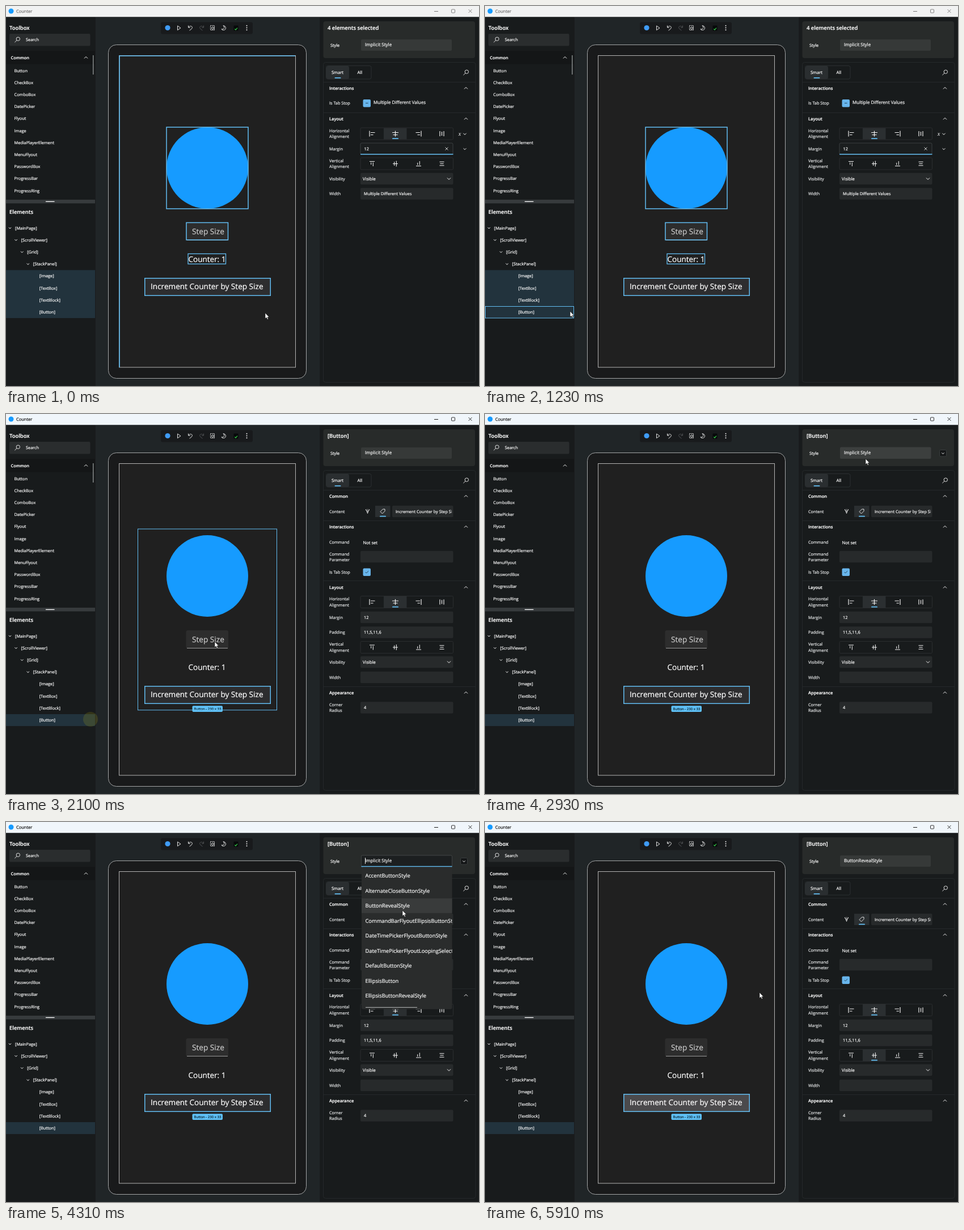
An HTML page for the animation above (6.53 s loop, 834 by 671 pixels).

```html
<!DOCTYPE html>
<html lang="en">
<head>
<meta charset="utf-8">
<title>Counter</title>
<style>
  html, body { margin: 0; width: 100%; height: 100%; overflow: hidden; background: #181b1c; }
  svg { display: block; width: 834px; height: 671px; }
  text { font-family: "Open Sans", "Noto Sans", sans-serif; text-rendering: geometricPrecision; white-space: pre; }
</style>
</head>
<body>
<svg id="stage" viewBox="0 0 834 671"></svg>
<script>
const LOOP = 6530;
const BLUE = '#62bdf2', FIELD = '#272a2b', LINE = '#25292b', INK = '#f6f6f6';

// Drawing helpers: each returns SVG markup.
const rect = (x, y, w, h, fill, rx = 0, more = '') =>
  `<rect x="${x}" y="${y}" width="${w}" height="${h}" fill="${fill}" rx="${rx}" ${more}/>`;
const frame = (x, y, w, h, color, width = 1, rx = 0, fill = 'none') =>
  rect(x, y, w, h, fill, rx, `stroke="${color}" stroke-width="${width}"`);
const path = (d, color = INK, width = 1, fill = 'none') =>
  `<path d="${d}" fill="${fill}" stroke="${color}" stroke-width="${width}"/>`;
const dot = (x, y, r, fill) => `<circle cx="${x}" cy="${y}" r="${r}" fill="${fill}"/>`;
const text = (x, mid, str, size = 7.35, fill = INK, weight = 400) =>
  `<text x="${x}" y="${mid + size * 0.36}" font-size="${size}" font-weight="${weight}" ` +
  `fill="${fill}" stroke="${fill}" stroke-width=".22">${str}</text>`;
const group = (name, ...parts) => `<g class="${name}">${parts.join('')}</g>`;
const chevron = (x, y, up, s = 3, color = INK) =>
  path(`M${x - s} ${y + (up ? s / 2 : -s / 2)}l${s} ${up ? -s : s} ${s} ${up ? s : -s}`, color, 1);
const lens = (x, y) =>
  `<circle cx="${x + 1.3}" cy="${y - 1.3}" r="3.2" fill="none" stroke="${INK}" stroke-width=".9"/>` +
  path(`M${x - 1} ${y + 1}l-3.6 3.6`, INK, 0.9);

function titleBar(bg, ink) {
  return rect(0, 0, 834, 19.5, bg) + dot(9, 9, 4.5, '#169bff') + text(18, 9, 'Counter', 7.5, ink) +
    path('M755 9.5h7', ink) + frame(785.5, 6, 6, 6, ink, 0.9, 1) + path('M815.5 6l6 6m0-6l-6 6', ink, 0.9);
}

function leftPanel() {
  const items = ['Button', 'CheckBox', 'ComboBox', 'DatePicker', 'Flyout', 'Image', 'MediaPlayerElement',
    'MenuFlyout', 'PasswordBox', 'ProgressBar', 'ProgressRing'];
  const parents = ['[MainPage]', '[ScrollViewer]', '[Grid]', '[StackPanel]'];
  const leaves = ['[Image]', '[TextBox]', '[TextBlock]', '[Button]'];
  return rect(0, 19.5, 157.5, 652, '#181b1c') +
    text(6, 38.5, 'Toolbox', 9.45, '#fff', 600) +
    rect(6, 49, 142.5, 21.5, '#2a2d2e', 2) + lens(20, 59.5) + text(35, 59.5, 'Search') +
    rect(0, 79.5, 157, 23, '#141617') + text(8.5, 91, 'Common', 7.35, '#fff', 600) + chevron(141, 91, true) +
    group('scrollbar', rect(153, 87, 1.5, 34, '#85898a')) +
    items.map((s, i) => text(14.5, 114 + 21.2 * i, s)).join('') +
    rect(0, 342, 157, 6.5, '#373b3d') + rect(70, 344.7, 15.5, 1.3, '#fff') +
    text(6, 364, 'Elements', 9.45, '#fff', 600) +
    group('multi', rect(0, 466.3, 157, 84.7, '#22333d')) +
    group('single', rect(0, 530, 157, 21, '#22333d')) +
    group('rowHover', frame(0.5, 530.5, 156, 20.5, BLUE)) +
    parents.map((s, i) => chevron(7 + 10.6 * i, 392 + 21.2 * i, false, 2.2) +
      text(16 + 10.6 * i, 392 + 21.2 * i, s)).join('') +
    leaves.map((s, i) => text(58.7, 476.8 + 21.2 * i, s)).join('');
}

function toolbar() {
  return rect(273, 28.5, 162, 21, '#181a1c', 3) + dot(285, 38.5, 4.6, '#3f9bf5') +
    path('M302.5 35l5.5 3.8-5.5 3.8z', INK, 0.9) +
    path('M321.5 34.5v3.5h3.5M321.8 37.8c2-3.6 7-2.8 6.5.8q-.5 2-4.8 4.6', INK, 0.9) +
    path('M348.5 34.5v3.5h-3.5M348.2 37.8c-2-3.6-7-2.8-6.5.8q.5 2 4.8 4.6', '#55595b', 0.9) +
    rect(360.5, 34.5, 7, 8, 'none', 0, `stroke="${INK}" stroke-dasharray="1.5 1"`) +
    `<circle cx="364.5" cy="39" r="2" fill="#181a1c" stroke="${INK}"/>` +
    path('M383 34.5c4 4 1 7-3 6.3c2 3.2 8 2 7.5-2.6q-.5-3-4.5-3.7z', INK, 0.9) +
    rect(401.5, 34.5, 8, 9, '#07090a', 1) + path('M403.3 40.5l1.7 1.7 3-3.5', '#35d04a', 1.2) +
    [34.7, 38.5, 42.3].map(y => dot(424.5, y, 1, INK)).join('');
}

function phone() {
  return rect(157.5, 19.5, 396, 652, '#202527') + toolbar() +
    frame(180.5, 68.5, 349, 589, '#a3a5a6', 1, 14, '#191a1b') +
    frame(199.5, 87.5, 311, 550.5, '#b4b4b4', 1, 0, '#202020') +
    group('gridHover', path('M200 638V88H510', BLUE, 1.6)) +
    dot(355, 286, 72, '#169bff') +
    rect(317.5, 382, 74.5, 32, '#2d2d2d', 3) + path('M319 413.5h72', '#9a9a9a') +
    text(328, 398, 'Step Size', 13.65, '#c9c9c9') +
    text(321.5, 447, 'Counter: 1', 13.5, '#fff') +
    rect(244, 480, 222.5, 31.5, '#2d2d2f') +
    group('revealed', rect(244, 480, 222.5, 31.5, '#4b4a4c')) +
    frame(244.75, 480.75, 221.5, 30.5, BLUE, 1.5) +
    text(255, 495.5, 'Increment Counter by Step Size', 13.6, '#fff') +
    group('multi', frame(283, 214, 144, 144, BLUE, 1.5), frame(318, 382.5, 73.5, 30.5, BLUE, 1.5),
      frame(321, 437.5, 66.5, 18, BLUE, 1.3)) +
    group('single', rect(328.5, 515.3, 53.5, 10.7, '#5fc1f7', 2),
      text(331.5, 520.7, 'Button - 230 x 33', 6.05, '#12303f')) +
    group('stackHover', frame(232.5, 203, 245, 319.8, BLUE));
}

// Property panel pieces
const section = (y, name) => text(570, y, name, 7.5, '#fff', 600) + chevron(811, y, true);
const rule = y => rect(560, y, 268, 1, LINE);
const label = (y, ...lines) => lines.map((s, i) =>
  text(570, y + (i - (lines.length - 1) / 2) * 10.5, s, 7.3, '#e2e4e5')).join('');
const field = (y, value = '', x = 625) =>
  rect(x, y - 10.3, 788.5 - x, 20.5, FIELD, 2) + text(x + 6, y, value);
const under = (x, y) => rect(x, y, 11, 1.8, BLUE, 1);
const cell = (x, y) => rect(x, y - 10, 40.5, 20, '#2b2f31') + under(x + 15, y + 7.8);

function alignBar(y, vertical, chosen) {
  const bars = ['M-4.5-5V5M-2.500-2H5M-2.5 2H2', 'M0-5V5M-5.5-2H5.5M-4 2H4', 'M4.5-5V5M2.5-2H-5M2.5 2H-2',
    'M-3.5-4.5V4.5M3.5-4.5V4.5M0-3.500V3.5'];
  const turn = vertical ? 'rotate(90) scale(.9)' : '';
  const icons = bars.map((d, i) =>
    `<g transform="translate(${645.5 + 41 * i} ${y}) ${turn}">${path(d, INK, 1.15)}</g>`);
  return frame(625, y - 10.5, 163.5, 21, '#2a2d2f', 1, 2) + (chosen ? cell(666, y) : '') + icons.join('');
}

const visibility = y => label(y, 'Visibility') + field(y) + text(629, y, 'Visible', 7.6) + chevron(781, y, false);
const check = (y, mixed) => rect(629.5, y - 6.5, 13.5, 13.5, '#68b5ec', 2) +
  path(mixed ? `M634 ${y}h4.5` : `M633.5 ${y}l2 2 3.5-3.8`, '#1d3a4c', 0.9);

const multiProps = () => text(567, 38.5, '4 elements selected', 9.45, '#fff', 600) +
  section(145, 'Interactions') + label(171.5, 'Is Tab Stop') + check(171.5, true) +
  text(648, 170.5, 'Multiple Different Values', 8) + rule(188) +
  section(199, 'Layout') + label(225.5, 'Horizontal', 'Alignment') + alignBar(225.5, false, true) +
  `<text x="797.5" y="228.5" font-size="9" font-style="italic" fill="${INK}" style="font-family:'Noto Serif',serif">x</text>` +
  chevron(809, 226, false, 2.6) +
  label(252, 'Margin') + frame(625, 242, 163, 20, '#3b3f41', 1, 2, '#1b1e1f') + rect(625, 261, 163.5, 1.5, BLUE) +
  text(631.5, 252, '12') + path('M774.5 249.5l5 5m0-5l-5 5', INK, 0.8) + chevron(809, 252.5, false, 2.4) +
  group('marginCaret', rect(640.5, 247.5, 0.9, 9, '#fff')) +
  label(278.5, 'Vertical', 'Alignment') + alignBar(278.5, true, false) + visibility(305) +
  label(331.5, 'Width') + field(331.5, 'Multiple Different Values');

const buttonProps = () => text(567, 38.5, '[Button]', 9.45, '#fff', 600) +
  section(145, 'Common') + label(172, 'Content') +
  path('M634 169l2 2h3l2-2M636 171l1.5 4.5 1.5-4.5M634.5 168.5h1M637 168.5h1M639.5 168.5h1') +
  rect(651, 162, 26.5, 20, '#2b2f31') + under(659, 179.8) +
  path('M660 172.5l4.5-4.5h3.5v3.5l-4.5 4.5z', INK, 0.9) +
  field(172, '', 681) + `<g clip-path="url(#content)">${text(687, 172, 'Increment Counter by Step Size')}</g>` + rule(188) +
  section(199, 'Interactions') + label(226, 'Command') + text(629.5, 227, 'Not set', 7.6) +
  label(252.5, 'Command', 'Parameter') + field(252) + label(279, 'Is Tab Stop') + check(279) + rule(294) +
  section(306, 'Layout') + label(332, 'Horizontal', 'Alignment') + alignBar(332, false, true) +
  label(359, 'Margin') + field(359, '12') + label(385.5, 'Padding') + field(385.5, '11,5,11,6') +
  label(412, 'Vertical', 'Alignment') + group('revealed', cell(666, 412)) + alignBar(412, true, false) +
  visibility(438) + label(465, 'Width') + field(465) + rule(481) +
  section(492, 'Appearance') + label(518.5, 'Corner', 'Radius') + field(518.5, '4') +
  group('rowChevron', chevron(809, 172, false, 2.6));

function rightPanel() {
  return rect(553.5, 19.5, 281, 652, '#181b1c') +
    rect(559.5, 27, 267.5, 65, '#282b2a', 4) + text(572, 69, 'Style', 7.3) +
    rect(626, 59, 160, 20, '#363938', 2) +
    group('styleHover', rect(626, 58.5, 160.5, 20.5, '#3c3f3e', 2),
      frame(801.5, 63.5, 12, 11.5, '#3a3e3f', 1, 2, '#151718'), chevron(807.5, 69.5, false, 2.2)) +
    group('styleOpen', frame(626.5, 59, 160, 20, '#3d4141', 1, 2, '#1c1f20'), rect(626.5, 77.8, 160, 1.5, BLUE)) +
    group('implicit', text(633, 68.5, 'Implicit Style', 8)) +
    group('reveal', text(633, 68.5, 'ButtonRevealStyle', 8)) +
    group('styleCaret', rect(633, 63, 0.9, 11, '#fff')) +
    frame(559.5, 99.5, 268.5, 565, LINE, 1, 4) +
    frame(564.5, 105.5, 79.5, 23.5, '#2b2f31', 1, 3) + rect(565, 106, 40, 23, '#2a2e30', 3) +
    text(574, 117.5, 'Smart', 7.5) + text(619.5, 117.5, 'All', 7.5) + under(579.5, 126) + lens(811, 117.5) + rule(134) +
    group('multiProps', multiProps()) + group('buttonProps', buttonProps());
}

function popup() {
  const items = ['AccentButtonStyle', 'AlternateCloseButtonStyle', 'ButtonRevealStyle',
    'CommandBarFlyoutEllipsisButtonStyle', 'DateTimePickerFlyoutButtonStyle',
    'DateTimePickerFlyoutLoopingSelectorStyle', 'DefaultButtonStyle', 'EllipsisButton', 'EllipsisButtonRevealStyle'];
  return group('popup', rect(627, 79.5, 159.5, 251, '#2a2c2c', 3),
    group('item1', rect(627, 108.5, 159.5, 26, '#393b3b')), group('item2', rect(627, 134.8, 159.5, 26, '#393b3b')),
    '<g clip-path="url(#list)">', ...items.map((s, i) => text(633.5, 94.8 + 26.5 * i, s, 9.3)), '</g>',
    rect(634, 326.8, 91, 1.2, '#a4a6a6'));
}

const stage = document.getElementById('stage');
stage.innerHTML =
  `<clipPath id="content"><rect x="681" y="160" width="104.5" height="24"/></clipPath>
   <clipPath id="list"><rect x="627" y="80" width="159.5" height="250"/></clipPath>` +
  group('idle', titleBar('#f1f2f2', '#767676')) + group('active', titleBar('#f0f6fb', '#1c1c1c')) +
  phone() + leftPanel() + group('splitter', rect(156.5, 20, 2, 651, '#4a5053')) + rightPanel() + popup() +
  group('ring', dot(0, 0, 13, '#ffef00')) +
  group('cursor', path('M0 0V10L2.3 8 3.9 11.4 5.5 10.7 4 7.4H7Z', '#111', 0.6, '#fff'));

// Hard-stepped looping animation from [time, properties] rows.
const start = document.timeline.currentTime ?? 0;
function play(name, rows) {
  const keys = rows.map(([t, props]) => ({ ...props, offset: t / LOOP, easing: 'step-end' }));
  keys.push({ ...rows[rows.length - 1][1], offset: 1 });
  for (const el of stage.querySelectorAll('.' + name)) {
    el.animate(keys, { duration: LOOP, iterations: Infinity }).startTime = start;
  }
}

// Visible only within the given [from, to] spans.
function show(name, ...spans) {
  const rows = spans[0][0] > 0 ? [[0, { opacity: 0 }]] : [];
  for (const [from, to] of spans) {
    rows.push([from, { opacity: 1 }]);
    if (to < LOOP) rows.push([to, { opacity: 0 }]);
  }
  play(name, rows);
}

const SELECT = 1515, OPEN = 3140, PICK = 4590;
show('idle', [0, SELECT]);
show('active', [SELECT, LOOP]);
show('multi', [0, SELECT]);
show('single', [SELECT, LOOP]);
show('multiProps', [0, 1590]);
show('buttonProps', [1590, LOOP]);
show('scrollbar', [0, 2600]);
show('gridHover', [0, 515], [1880, 1950], [2430, 2500]);
show('stackHover', [1950, 2430]);
show('rowHover', [910, 1800]);
show('splitter', [840, 910], [1800, 1860]);
show('marginCaret', [450, 980]);
show('styleCaret', [3200, 3730], [4260, PICK]);
show('rowChevron', [2560, 2680], [5630, 5700]);
show('styleHover', [2800, PICK + 70]);
show('styleOpen', [OPEN, PICK]);
show('popup', [OPEN, PICK]);
show('item1', [3800, 4130]);
show('item2', [4130, PICK]);
show('implicit', [0, PICK]);
show('reveal', [PICK, LOOP]);
show('revealed', [5390, LOOP]);

const at = (x, y) => `translate(${x}px, ${y}px)`;
play('ring', [
  [0, 149, 539, 0], [1440, 149, 539, 0.6], [1970, 149, 539, 0.4], [2040, 149, 539, 0.25], [2100, 149, 539, 0.12],
  [2190, 679, 67, 0], [3070, 679, 67, 0.6], [3730, 679, 67, 0.3], [3800, 701, 150, 0],
  [4470, 701, 150, 0.6], [5390, 701, 150, 0.3], [5450, 701, 150, 0]
].map(([t, x, y, opacity]) => [t, { transform: at(x, y), opacity }]));

// Pointer moves: first change, last change, number of changes, target.
const moves = [
  [70, 640, 10, 177, 541], [770, 980, 4, 151, 538], [1230, 1230, 1, 150, 539],
  [1770, 2100, 6, 368, 402], [2190, 2740, 9, 668, 112], [2800, 2930, 3, 671, 79], [3000, 3000, 1, 679, 67],
  [3730, 3730, 1, 679, 74], [3800, 3800, 1, 680, 110], [3950, 4310, 7, 699, 156],
  [4470, 4470, 1, 701, 150], [5630, 5910, 5, 484, 301]
];
let x = 457, y = 542;
const steps = [[0, { transform: at(x, y) }]];
for (const [from, to, n, tx, ty] of moves) {
  for (let i = 1; i <= n; i++) {
    const u = i / n, k = u * u * (3 - 2 * u);
    const t = n > 1 ? from + (to - from) * (i - 1) / (n - 1) : from;
    steps.push([t, { transform: at(x + (tx - x) * k, y + (ty - y) * k) }]);
  }
  [x, y] = [tx, ty];
}
play('cursor', steps);
</script>
</body>
</html>
```
